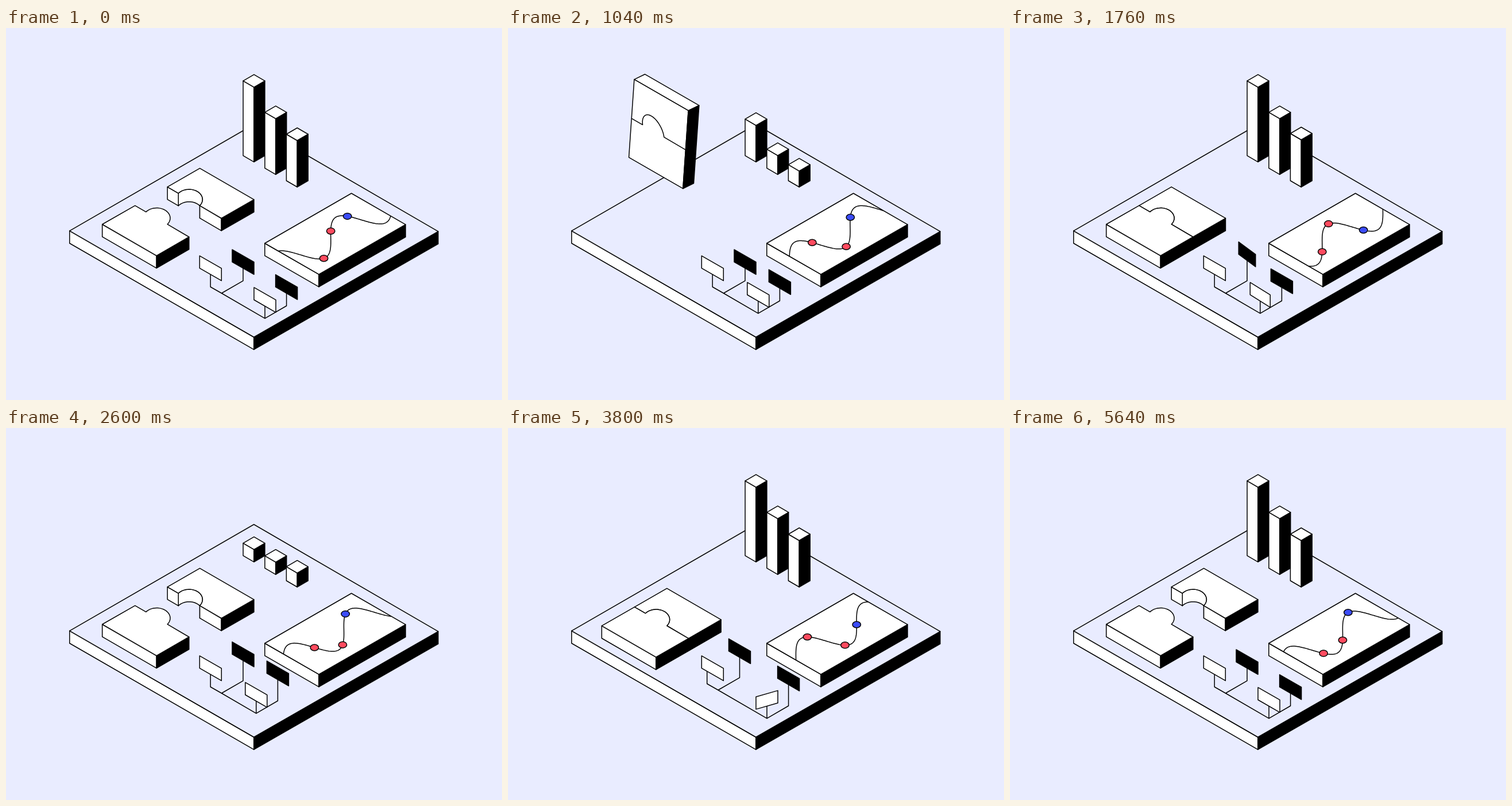
These frames come from a looping animation (864x648 px, 5.68 s). An HTML page with a canvas:

```html
<!DOCTYPE html>
<html lang="en">
<head>
<meta charset="utf-8">
<title>Isometric dashboard</title>
<style>
  html, body { margin: 0; width: 100%; height: 100%; overflow: hidden; background: #e9ecff; }
  canvas { display: block; width: 864px; height: 648px; }
</style>
</head>
<body>
<canvas id="stage"></canvas>
<script>
const W = 864, H = 648, LOOP = 5680, STEP = 40;
const BG = '#e9ecff', WHITE = '#fff', BLACK = '#000', RED = '#ff4b5f', BLUE = '#3b4cf8';
const COS = Math.cos(Math.PI / 6), DEPTH = 21.7, RAD = Math.PI / 180;

const canvas = document.getElementById('stage');
const ctx = canvas.getContext('2d');
const ratio = window.devicePixelRatio || 1;
canvas.width = W * ratio;
canvas.height = H * ratio;

// Timing helpers
const part = (t, a, b) => Math.min(1, Math.max(0, (t - a) / (b - a)));
const smooth = q => (1 - Math.cos(Math.PI * q)) / 2;
const ramp = (t, a, b) => smooth(part(t, a, b));
const hold = (t, a, b, c, d) => ramp(t, a, b) - ramp(t, c, d);

function bezier(x1, y1, x2, y2) {
  const at = (s, p, q) => 3 * (1 - s) * (1 - s) * s * p + 3 * (1 - s) * s * s * q + s * s * s;
  return x => {
    if (x <= 0 || x >= 1) return x <= 0 ? 0 : 1;
    let lo = 0, hi = 1;
    for (let i = 0; i < 24; i++) {
      const mid = (lo + hi) / 2;
      if (at(mid, x1, x2) < x) lo = mid; else hi = mid;
    }
    return at(lo, y1, y2);
  };
}
const sink = bezier(.8, 0, .4, 1);
const spring = bezier(.7, 0, .05, 1.4);

// Drawing helpers
function trace(pts) {
  ctx.beginPath();
  pts.forEach(([x, y], i) => i ? ctx.lineTo(x, y) : ctx.moveTo(x, y));
}
function line(pts) {
  trace(pts);
  ctx.stroke();
}
function poly(pts, fill) {
  trace(pts);
  ctx.closePath();
  ctx.fillStyle = fill;
  ctx.fill();
  ctx.stroke();
}
const shift = (pts, dx, dy) => pts.map(([x, y]) => [x + dx, y + dy]);
const wall = (pts, h, fill) => poly([...pts, ...shift(pts, 0, h).reverse()], fill);

// Slab given by its left, top, right and bottom corners
function slab([l, t, r, b], h, fill) {
  wall([l, b], h, WHITE);
  wall([b, r], h, BLACK);
  poly([l, t, r, b], fill);
}

// Bars
const BARS = [
  { x: 432, y: 222.3, low: 21.5, high: 130.2 },
  { x: 469.8, y: 244.2, low: 21.5, high: 97.3 },
  { x: 507.3, y: 266, low: 24.3, high: 81 }
];
const CYCLE = LOOP / 3;

function drawBars(t) {
  const p = t % CYCLE;
  BARS.forEach(({ x, y, low, high }, i) => {
    const rise = 680 + 77 * i;
    const k = p < rise
      ? 1 - sink(part(p, 20 + 20 * i, 680 + 20 * i))
      : spring(part(p, rise, rise + 980));
    const h = low + (high - low) * k;
    const top = y - h;
    slab([[x - 18.9, top], [x, top - 11], [x + 18.9, top], [x, top + 11]], h, WHITE);
  });
}

// Puzzle
const MID = [271.7, 336.5];
const TAB = Array.from({ length: 29 }, (_, i) => {
  const a = Math.PI + .654 + Math.PI * i / 28;
  return [262.5 + 23.5 * Math.cos(a), 331.2 + 17.7 * Math.sin(a)];
});
const [LEFT, BACK, RIGHT, FRONT] = [[167.7, 342], [281.2, 276.8], [375.5, 331.4], [262.2, 396.6]];
const SEAM_A = [224.8, 309.4], SEAM_B = [318.8, 364];
const SEAM = [SEAM_A, ...TAB, SEAM_B];
const FLIGHT = [860, 1620];

function drawPieces(gap, push) {
  const far = pts => shift(pts, 56.4 * gap - push, -32.5 * gap + push * .577);
  const near = pts => shift(pts, -push, push * .577);
  wall(far(TAB), DEPTH, WHITE);
  wall(far([SEAM_A, TAB[0]]), DEPTH, WHITE);
  wall(far([TAB[28], SEAM_B]), DEPTH, WHITE);
  wall(far([SEAM_B, RIGHT]), DEPTH, BLACK);
  poly(far([BACK, RIGHT, ...SEAM.slice().reverse()]), WHITE);
  wall(near([LEFT, FRONT]), DEPTH, WHITE);
  wall(near([FRONT, SEAM_B]), DEPTH, BLACK);
  poly(near([LEFT, ...SEAM, FRONT]), WHITE);
}

// One full turn about the block's long front edge direction while airborne
function drawFlip(q) {
  const turn = 2 * Math.PI * q;
  const s = Math.sin(turn), c = Math.cos(turn);
  const lift = 187 * (1 - Math.pow(Math.abs(2 * q - 1), 3.5));
  const [a, b, d] = [54.4, 65.4, DEPTH / 2];
  const project = ([x, y, z]) => {
    const ry = y * c - z * s, rz = y * s + z * c;
    return [MID[0] + COS * (x + ry), MID[1] + d - lift + (x - ry) / 2 - rz];
  };
  const face = (pts, fill) => poly(pts.map(project), fill);
  const side = Math.sign(s - c) * b;
  face([[-a, side, -d], [a, side, -d], [a, side, d], [-a, side, d]], WHITE);
  const z = s + c > 0 ? d : -d;
  face([[-a, -b, z], [a, -b, z], [a, b, z], [-a, b, z]], WHITE);
  line(SEAM.map(([px, py]) => {
    const u = (px - MID[0]) / COS, v = 2 * (py - MID[1]);
    return project([(u + v) / 2, (u - v) / 2, z]);
  }));
  face([[a, -b, -d], [a, b, -d], [a, b, d], [a, -b, d]], BLACK);
}

function drawPuzzle(t) {
  const q = part(t, ...FLIGHT);
  if (q > 0 && q < 1) return drawFlip(q);
  const gap = 1 - part(t, 520, 840) ** 2 + ramp(t, 1880, 2440)
    - part(t, 3415, 3735) ** 2 + ramp(t, 4850, 5400);
  drawPieces(gap, 4.4 * hold(t, 3720, 3790, 3800, 4120));
}

// Chart panel with a travelling wave
const PANEL = [[450.8, 375], [601.7, 288], [696, 342.3], [545, 429.2]];
const NODES = [[43, RED], [84, RED], [123.5, BLUE]];

function wavePoint(w, t) {
  const dv = 30 * Math.cos((-113 - .247 * t - 2.95 * (w - 84.5)) * RAD);
  const v = 56 + dv, u = w - dv / 3;
  return [PANEL[0][0] + COS * (u + v), PANEL[0][1] + (v - u) / 2];
}

function drawChart(t) {
  slab(PANEL, DEPTH, WHITE);
  ctx.save();
  trace(PANEL);
  ctx.clip();
  line(Array.from({ length: 161 }, (_, i) => wavePoint(-16 + i * 1.3, t)));
  ctx.restore();
  for (const [w, fill] of NODES) {
    const [x, y] = wavePoint(w, t);
    ctx.beginPath();
    ctx.ellipse(x, y, 7.2, 5.5, 0, 0, 2 * Math.PI);
    ctx.fillStyle = fill;
    ctx.fill();
    ctx.stroke();
  }
}

// Tree of flags
function flag([x, y], fill, slope = 1, width = 1) {
  const dx = 19 * width, dy = 10.9 * slope, h = 10.8;
  poly([[x - dx, y - dy - h], [x + dx, y + dy - h], [x + dx, y + dy + h], [x - dx, y - dy + h]], fill);
}
const spin = q => Math.abs(Math.cos(Math.PI * q));

function drawTree(t) {
  const back = 9.5 * hold(t, 3080, 3560, 5200, 5620);
  const front = 15.2 * hold(t, 640, 1000, 3080, 3560);
  const a = (x, y) => [x - back, y - back * .577];
  const b = (x, y) => [x - front, y - front * .577];
  const liftB = 13.3 * hold(t, 1240, 1700, 3820, 4200);
  const liftD = 15 * hold(t, 1690, 2040, 4500, 4850);
  const flagB = a(413, 407.6 - liftB), flagC = b(451, 473.6), flagD = b(488.6, 451.3 - liftD);
  const fork = a(375.5, 462), root = b(451, 505.8);

  line([a(356.2, 418.5), a(356.2, 451), fork, root, flagC]);
  line([flagB, a(413, 440.3), fork]);
  line([flagD, b(488.6, 484), root]);

  flag([356.3, 418.5], WHITE);
  flag(flagB, BLACK, 1, spin(part(t, 1400, 1860)));
  flag(flagC, WHITE, 1 - 2 * hold(t, 3560, 3920, 4900, 5360), spin(part(t, 1700, 2170)));
  flag(flagD, BLACK);
}

function draw(t) {
  const jolt = 4 * Math.sin(Math.PI * part(t, 1610, 1740));
  ctx.setTransform(ratio, 0, 0, ratio, 0, 0);
  ctx.fillStyle = BG;
  ctx.fillRect(0, 0, W, H);
  ctx.translate(0, jolt);
  ctx.strokeStyle = BLACK;
  ctx.lineWidth = 1.5;
  ctx.lineJoin = 'round';
  slab([[110.8, 353.3], [431.8, 168], [752.8, 354.3], [431.8, 538.5]], DEPTH, BG);
  drawBars(t);
  drawPuzzle(t);
  drawChart(t);
  drawTree(t);
}

const start = performance.now();
function tick() {
  const t = (performance.now() - start) % LOOP;
  draw(Math.floor(t / STEP) * STEP);
  requestAnimationFrame(tick);
}
tick();
</script>
</body>
</html>
```
